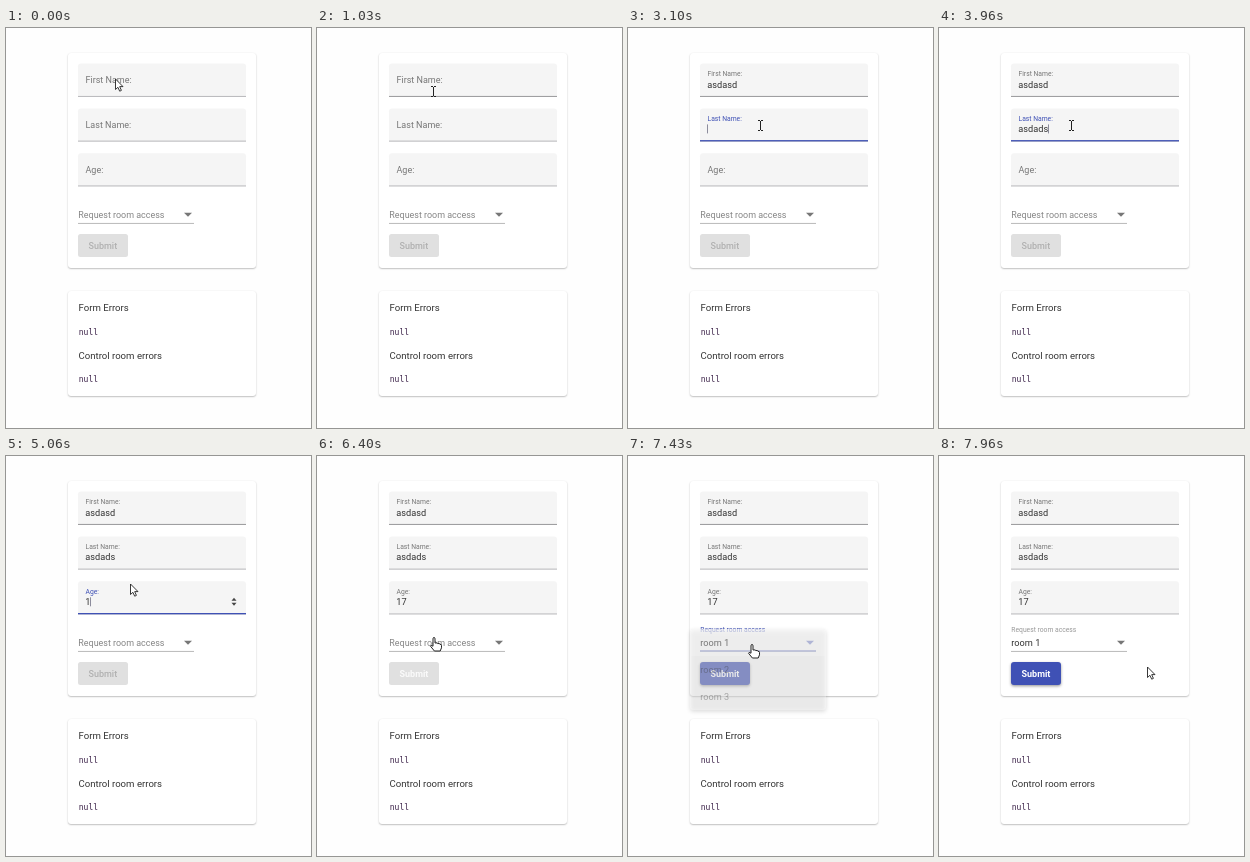
Write an HTML page with a canvas that moves like this. It is 305 px wide and 400 px high and loops after 8000 ms.

```html
<!DOCTYPE html>
<html lang="en">
<head>
<meta charset="utf-8">
<title>Room access form</title>
<style>
  html, body { margin: 0; width: 100%; height: 100%; overflow: hidden; background: #fefefe; }
  canvas { display: block; width: 305px; height: 400px; }
</style>
</head>
<body>
<canvas id="stage" width="305" height="400"></canvas>
<script>
const ctx = document.getElementById('stage').getContext('2d');
const LOOP = 8000;
const BLUE = '#3f51b5', LABEL = '#777', INK = '#333', LINE = '#949494';

const OPEN = 6490, PICK = 7370, LEAVE = 7855;

const fields = [
  { label: 'First Name:', y: 35.6, focus: 1460, blur: 2760, value: 'asdasd',
    keys: [1740, 1820, 1900, 1970, 2080, 2200] },
  { label: 'Last Name:', y: 80.4, focus: 2770, blur: 4280, value: 'asdads',
    keys: [3240, 3350, 3460, 3570, 3690, 3820] },
  { label: 'Age:', y: 125.3, focus: 4290, blur: 6200, value: '17',
    keys: [4960, 5500], spinner: true }
];

// time, x, y of the pointer's hot spot
const path = [
  [0, 109, 51], [660, 109, 51], [900, 116, 66], [1200, 115, 58],
  [2300, 115, 58], [2720, 132, 97], [3960, 132, 97], [4260, 125, 139],
  [4860, 125, 139], [5050, 124, 128], [5730, 124, 128], [6360, 117, 181],
  [6560, 117, 181], [6850, 118, 212], [7060, 118, 212], [7200, 117, 187],
  [7390, 117, 187], [7660, 225, 207], [7860, 225, 207], [7960, 208, 211]
];

const clamp = v => Math.max(0, Math.min(1, v));
const ease = v => { v = clamp(v); return v * v * (3 - 2 * v); };
const ramp = (t, start, length) => ease((t - start) / length);
const mix = (a, b, p) => a + (b - a) * p;

function text(str, x, y, size, color, weight = 400, family = 'Roboto, sans-serif') {
  ctx.font = `${weight} ${size}px ${family}`;
  ctx.fillStyle = color;
  ctx.fillText(str, x, y);
  return ctx.measureText(str).width;
}

function rect(x, y, w, h, color) {
  ctx.fillStyle = color;
  ctx.fillRect(x, y, w, h);
}

function rounded(x, y, w, h, r, color) {
  ctx.beginPath();
  ctx.roundRect(x, y, w, h, r);
  ctx.fillStyle = color;
  ctx.fill();
}

function polygon(points, color) {
  ctx.beginPath();
  points.forEach(([x, y]) => ctx.lineTo(x, y));
  ctx.closePath();
  ctx.fillStyle = color;
  ctx.fill();
}

function raised(x, y, w, h, color, alpha, blur, drop) {
  ctx.save();
  ctx.shadowColor = `rgba(0,0,0,${alpha})`;
  ctx.shadowBlur = blur;
  ctx.shadowOffsetY = drop;
  rounded(x, y, w, h, 3, color);
  ctx.restore();
}

// Thin resting line; the blue one grows from the middle and fades on blur.
function underline(t, start, end, x, bottom, w, color = LINE) {
  rect(x, bottom - 0.65, w, 0.65, color);
  if (t < start || t >= end + 100) return;
  const half = w / 2 * ramp(t, start, 180);
  ctx.globalAlpha = 1 - ramp(t, end, 100);
  rect(x + w / 2 - half, bottom - 1.3, half * 2, 1.3, BLUE);
  ctx.globalAlpha = 1;
}

function drawField(f, t) {
  const active = t >= f.focus && t < f.blur;
  const lift = ramp(t, f.focus, 150);
  rounded(72, f.y, 168, 33, [3, 3, 0, 0], '#f5f5f5');
  const shade = mix(148, 100, f.y < 40 ? ramp(t, 60, 340) : 0);
  underline(t, f.focus, f.blur, 72, f.y + 33, 168, `rgb(${shade},${shade},${shade + 4})`);
  text(f.label, 79.5, f.y + mix(19.4, 12.3, lift), mix(9, 6.75, lift), active ? BLUE : LABEL);

  const typed = f.value.slice(0, f.keys.filter(k => t >= k).length);
  const width = text(typed, 79.3, f.y + 24, 9.2, INK);
  if (active && t > f.focus + 80) rect(Math.floor(79.5 + width), f.y + 16, 1, 9, '#8c8c9c');
  if (active && f.spinner) {
    polygon([[225.5, f.y + 19.5], [228, f.y + 16.5], [230.5, f.y + 19.5]], '#444');
    polygon([[225.5, f.y + 21.5], [228, f.y + 24.5], [230.5, f.y + 21.5]], '#444');
  }
}

function drawSelect(t) {
  const active = t >= OPEN && t < LEAVE;
  const lift = ramp(t, OPEN, 150);
  underline(t, OPEN, LEAVE, 72, 195.6, 116);
  text('Request room access', 72.3, mix(189.7, 176, lift), mix(8.95, 6.75, lift),
    active ? BLUE : lift ? '#999' : '#858585');
  if (t >= PICK) text('room 1', 72.3, 189.7, 9.2, INK);
  polygon([[178, 184.7], [186, 184.7], [182, 188.7]], active ? BLUE : LABEL);
}

function drawSubmit(t) {
  const enabled = t >= PICK;
  if (enabled) raised(72, 206, 50, 23, BLUE, 0.4, 3, 1.2);
  else rounded(72, 206, 50, 23, 2.5, '#e0e0e0');
  const color = enabled ? '#fff' : t >= 6200 ? '#fafafa' : '#b0b0b0';
  text('Submit', 82.5, 220.6, 9, color, t >= 6200 ? 700 : 500);
}

function drawPanel(t) {
  if (t < OPEN || t >= PICK + 100) return;
  const grow = ramp(t, OPEN, 120);
  ctx.save();
  ctx.globalAlpha = grow * (1 - clamp((t - PICK) / 100));
  ctx.translate(0, 173);
  ctx.scale(1, mix(0.8, 1, grow));
  raised(62, 0, 136, 81, '#fff', 0.36, 4.5, 1.6);
  const pointerY = pointer(t).y - 173;
  for (let row = 0; row < 3; row++) {
    const hovered = pointerY >= row * 27 && pointerY < row * 27 + 27;
    const radii = row === 0 ? [3, 3, 0, 0] : 0;
    if (row === 0 || hovered) rounded(62, row * 27, 136, 27, radii, '#f3f3f3');
    text(`room ${row + 1}`, 72.3, row * 27 + 16.7, 9.1, '#3a3a3a');
  }
  ctx.restore();
}

function pointer(t) {
  const i = path.findIndex(p => p[0] > t);
  if (i < 0) return { x: path.at(-1)[1], y: path.at(-1)[2] };
  const [t0, x0, y0] = path[i - 1], [t1, x1, y1] = path[i];
  const p = ease((t - t0) / (t1 - t0));
  return { x: mix(x0, x1, p), y: mix(y0, y1, p) };
}

function outline(shape, width) {
  ctx.lineJoin = 'round';
  ctx.lineWidth = width;
  ctx.strokeStyle = '#222';
  ctx.fillStyle = '#fff';
  ctx.fill(shape);
  ctx.stroke(shape);
}

const arrow = new Path2D('M.5 0V10.5L2.9 8.3 4.7 12.2 6.4 11.4 4.7 7.6H8Z');
const hand = new Path2D('M-1 1.2Q0-.4 1 1.2V6L3 5.9Q3.5 5.8 3.7 6.6L5.2 6.5Q6 6.5 6 7.4' +
  'Q7.5 7 7.5 8.4V10.8L6.2 14H.4L-3.5 9.2Q-3.4 7.6-1 9.2Z');

function drawPointer(t) {
  const { x, y } = pointer(t);
  const inField = fields.some(f => y > f.y + 4 && y < f.y + 33 && x < 240);
  const overLabel = t < 740 || (t > 4950 && t < 5900);
  const onSelect = t > 6200 && t < 7460 && y > 172;
  ctx.save();
  ctx.translate(Math.round(x), Math.round(y));
  if (onSelect) {
    outline(hand, 1);
  } else if (inField && !overLabel) {
    rect(0, -4, 1, 9, '#222');
    for (const end of [-5, 5]) {
      rect(-2, end, 2, 1, '#222');
      rect(1, end, 2, 1, '#222');
    }
  } else {
    outline(arrow, 0.9);
  }
  ctx.restore();
}

function draw(t) {
  rect(0, 0, 305, 400, '#fefefe');
  raised(62, 25, 188, 215, '#fff', 0.3, 1.6, 0.8);
  raised(62, 263, 188, 105, '#fff', 0.3, 1.6, 0.8);

  fields.forEach(f => drawField(f, t));
  drawSelect(t);
  drawSubmit(t);

  const mono = '"DejaVu Sans Mono", monospace';
  text('Form Errors', 72.5, 283, 9.6, INK);
  text('null', 72.8, 306.6, 8, '#3a2047', 400, mono);
  text('Control room errors', 72.5, 330.7, 9.6, INK);
  text('null', 72.8, 354.3, 8, '#3a2047', 400, mono);

  drawPanel(t);
  drawPointer(t);
}

const began = performance.now();
function tick() {
  draw((performance.now() - began) % LOOP);
  requestAnimationFrame(tick);
}
tick();
</script>
</body>
</html>
```
